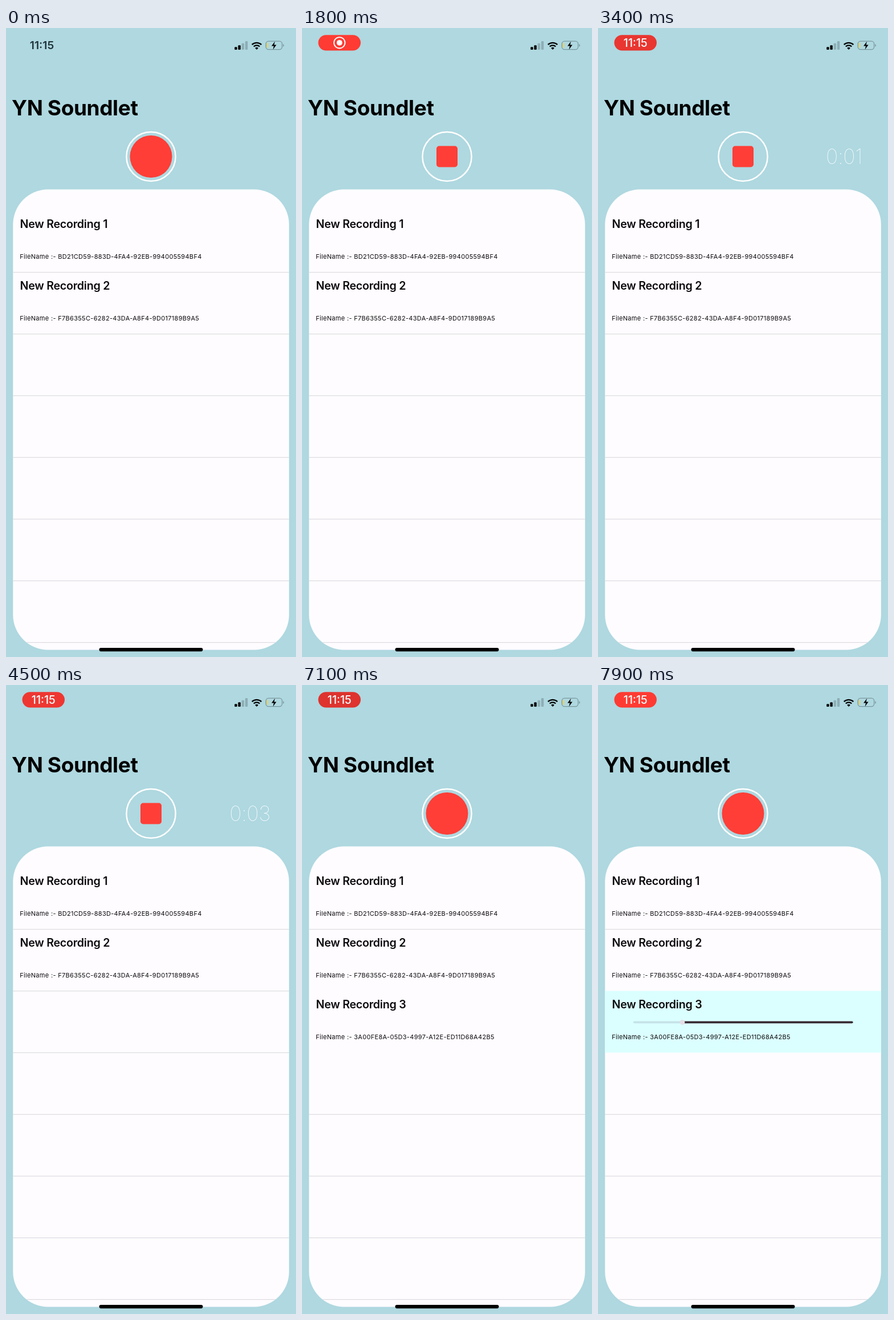
An HTML page that plays this animation: 509x1101 px, repeating every 8000 ms.

```html
<!DOCTYPE html>
<html lang="en">
<head>
<meta charset="utf-8">
<title>Voice recorder</title>
<style>
  html, body { margin: 0; width: 100%; height: 100%; overflow: hidden; background: #afd8e0; }
  svg { display: block; width: 509px; height: 1101px; font-family: Inter, "Noto Sans", sans-serif; }
  .title { font-size: 37px; font-weight: 700; letter-spacing: -.4px; }
  .name { font-size: 19.7px; font-weight: 600; letter-spacing: -.28px; fill: #0d0b0d; }
  .file { font-size: 11px; letter-spacing: .31px; fill: #0d0b0d; }
  .clock { font-size: 19.3px; font-weight: 600; fill: #20343a; }
  .timer { font-size: 36px; font-weight: 100; letter-spacing: -.4px; fill: #fff; text-anchor: end; }
</style>
</head>
<body>
<svg viewBox="0 0 509 1101">
  <defs>
    <clipPath id="panel"><rect x="12.3" y="282.5" width="484.5" height="806" rx="61.5"/></clipPath>
  </defs>
  <rect width="509" height="1101" fill="#afd8e0"/>

  <text id="clock" class="clock" x="41.8" y="37.4">11:15</text>
  <g id="pill">
    <rect id="pillBack" x="28.5" y="12.2" width="74.5" height="27.2" rx="13.6"/>
    <g id="pillIcon">
      <circle cx="65.8" cy="25.8" r="9.7" fill="none" stroke="#fff" stroke-width="1.9"/>
      <circle cx="65.8" cy="25.8" r="4.9" fill="#fff"/>
    </g>
    <text id="pillText" x="65.8" y="32.8" font-size="19.5" font-weight="500" fill="#fff" text-anchor="middle">11:15</text>
  </g>

  <g id="bars"></g>
  <g fill="none" stroke="#000" stroke-width="2.4">
    <path d="M431.7 29.2a12 12 0 0 1 16.6 0"/>
    <path d="M434.8 32.5a7.5 7.5 0 0 1 10.4 0"/>
  </g>
  <path d="M440 38l-2.9-2.9a4.2 4.2 0 0 1 5.8 0z"/>
  <rect x="456.2" y="23.2" width="28.4" height="14.4" rx="4.6" fill="none" stroke="#7b989e" stroke-width="1.3"/>
  <path d="M486.3 28v5q1.7-.7 1.7-2.5t-1.7-2.5z" fill="#7b989e"/>
  <path d="M460.2 25.6v9.8q-2-.4-2-2.6v-4.6q0-2.2 2-2.6z" fill="#f1cf4a"/>
  <path d="M472 23.6l-6 8h4l-1.4 6.2 6-8.2h-4z"/>

  <text class="title" x="10" y="153">YN Soundlet</text>

  <circle cx="254.5" cy="225" r="43.1" fill="none" stroke="#fff" stroke-width="2.5"/>
  <rect id="button" fill="#ff3e37"/>
  <text id="timer" class="timer" x="464" y="238.2"></text>

  <g clip-path="url(#panel)">
    <rect x="12" y="282" width="485" height="807" fill="#fefcff"/>
    <g id="lines" fill="#dddbdf"></g>
    <rect id="glow" x="12" y="535.5" width="485" height="108" fill="#dbffff"/>
    <g id="rows"></g>
    <g id="slider" stroke-width="3.8" stroke-linecap="round">
      <path id="rest" stroke="#382b33"/>
      <path id="played" stroke="#c4e3e8"/>
      <circle id="thumb" cy="590.3" r="4.4" fill="#e4dee6"/>
    </g>
  </g>
  <rect x="163.5" y="1085" width="182" height="6.2" rx="3.1"/>
</svg>
<script>
const LOOP = 8000, STEP = 100, ROW = 108;
const T = {
  start: 450, pill: 750, clock: 2300, tick: 2450,
  stop: 5150, saved: 5450, press: 7050, select: 7150, play: 7250
};
const files = [
  'BD21CD59-883D-4FA4-92EB-994005594BF4',
  'F7B6355C-6282-43DA-A8F4-9D017189B9A5',
  '3A00FE8A-05D3-4997-A12E-ED11D68A42B5'
];

const $ = id => document.getElementById(id);
const set = (el, attrs) => { for (const k in attrs) el.setAttribute(k, attrs[k]); return el; };
const add = (parent, tag, attrs, text = '') => {
  const el = set(document.createElementNS('http://www.w3.org/2000/svg', tag), attrs);
  el.textContent = text;
  return parent.appendChild(el);
};
const show = (id, opacity) => set($(id), { opacity: +opacity });
const mix = (a, b, k) => a + (b - a) * k;
const ramp = (t, from, length) => Math.min(1, Math.max(0, (t - from) / length));
const ease = k => k * k * (3 - 2 * k);

[4.8, 7.8, 11.3, 15].forEach((h, i) => add($('bars'), 'rect', {
  x: 401.2 + i * 6.2, y: 38 - h, width: 4.4, height: h, rx: 1.1, fill: i < 2 ? '#000' : '#8daeb5'
}));

const lines = Array.from({ length: 7 }, (_, i) =>
  add($('lines'), 'rect', { x: 12, y: 427 + i * ROW, width: 485, height: 1.2 }));

const rows = files.map((file, i) => {
  const row = add($('rows'), 'g', {});
  add(row, 'text', { class: 'name', x: 24.5, y: 350 + i * ROW }, `New Recording ${i + 1}`);
  add(row, 'text', { class: 'file', x: 24.3, y: 403.5 + i * ROW }, `FileName :- ${file}`);
  return row;
});

function drawStatus(t) {
  const grow = ease(ramp(t, T.pill, 150));
  const swap = ramp(t, T.clock, 200);
  const dim = t < 2000 ? 0 : (1 + Math.cos((t - 7000) / 1000 * Math.PI)) / 2;
  const rgb = [mix(255, 221, dim), mix(59, 51, dim), mix(51, 46, dim)].map(Math.round);
  show('clock', 1 - grow);
  show('pill', grow);
  show('pillIcon', 1 - swap);
  show('pillText', swap);
  set($('pillBack'), { fill: `rgb(${rgb})` });
}

function drawButton(t) {
  const k = ease(ramp(t, T.start, 300)) - ease(ramp(t, T.stop, 300));
  const size = mix(74, 37, k);
  set($('button'), {
    x: 254.5 - size / 2, y: 225 - size / 2, width: size, height: size, rx: mix(37, 4.8, k)
  });
  const seconds = Math.floor((t - T.tick) / 1000) + 1;
  $('timer').textContent = seconds > 0 && t < T.stop ? `0:0${seconds}` : '';
}

function drawList(t) {
  const pressed = t >= T.press;
  set(lines[1], { opacity: pressed ? 0 : 1 });
  set(lines[2], { opacity: pressed ? 0 : 1 });
  set(rows[2], { opacity: t >= T.saved ? 1 : 0 });
  show('glow', t >= T.select);
  show('slider', ramp(t, T.play - 50, 100));
  const x = 64 + 84 * Math.max(0, t - T.select) / 750;
  set($('played'), { d: `M63.9 590.3H${x}` });
  set($('rest'), { d: `M${x} 590.3H445.7` });
  set($('thumb'), { cx: x });
}

function draw(t) {
  drawStatus(t);
  drawButton(t);
  drawList(t);
}

const begin = performance.now();
function frame() {
  const t = (performance.now() - begin) % LOOP;
  draw(Math.floor(t / STEP) * STEP);
  requestAnimationFrame(frame);
}
frame();
</script>
</body>
</html>
```
